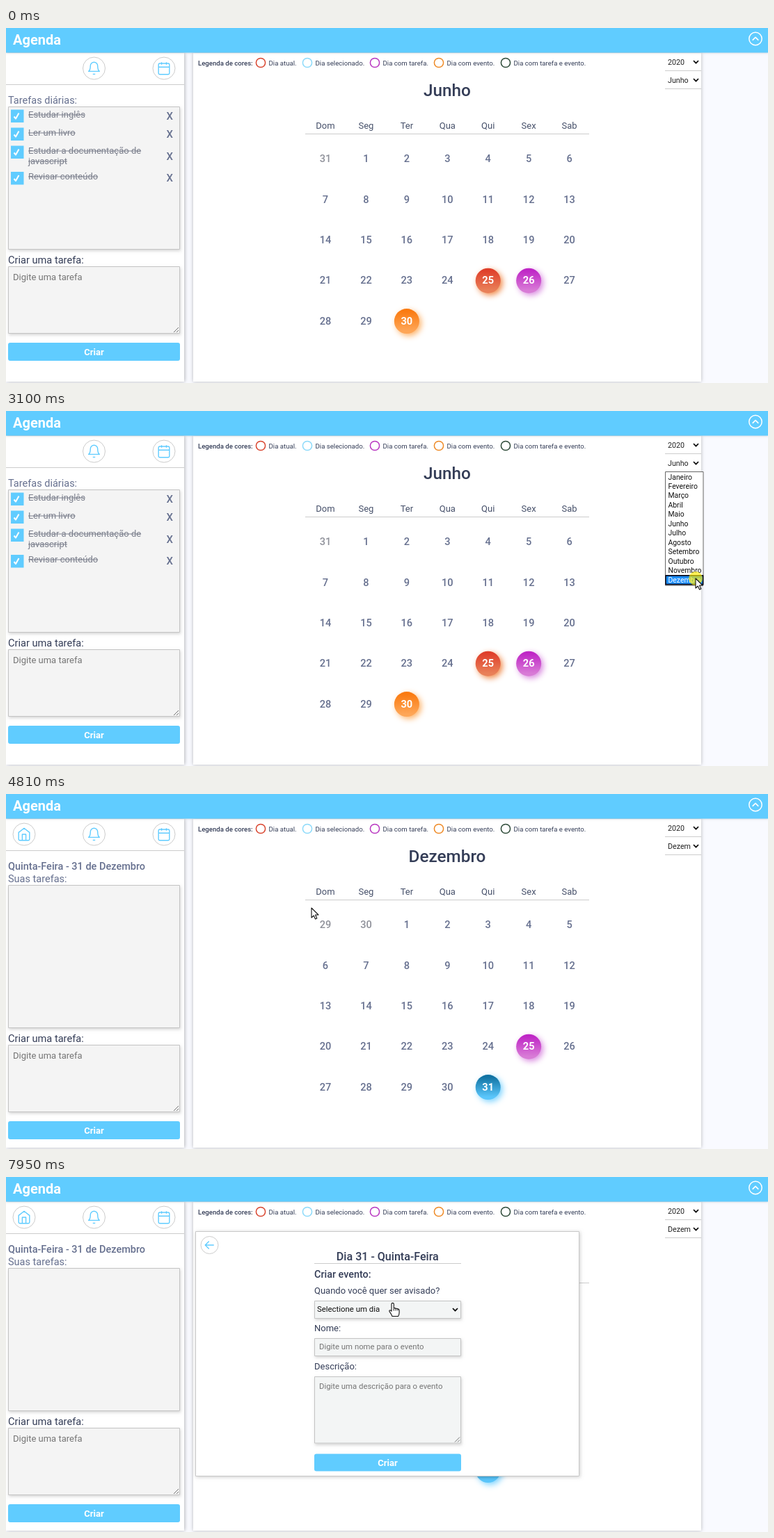
An HTML page with a canvas that plays this animation: 1095x511 px, repeating every 8000 ms.

```html
<!DOCTYPE html>
<html lang="pt">
<head>
<meta charset="utf-8">
<title>Agenda</title>
<style>
  html, body { margin: 0; height: 100%; overflow: hidden; background: #f9faff; }
  canvas { display: block; }
</style>
</head>
<body>
<canvas id="stage" width="1095" height="511"></canvas>
<script>
const LOOP = 8000;
const ctx = document.getElementById('stage').getContext('2d');
const BLUE = '#60ccff', LINE = '#ccc', SLATE = '#66708f', INK = '#343d57', HINT = '#757575';

const MONTHS = ['Janeiro', 'Fevereiro', 'Março', 'Abril', 'Maio', 'Junho', 'Julho',
  'Agosto', 'Setembro', 'Outubro', 'Novembro', 'Dezembro'];
const WEEKDAYS = ['Dom', 'Seg', 'Ter', 'Qua', 'Qui', 'Sex', 'Sab'];
const BADGES = {
  today: ['#df3f2b', '#e98058', '#f08a4a'],
  task: ['#bf26c6', '#d87bd6', '#d98ae0'],
  event: ['#fa7a10', '#fea657', '#fdb268'],
  selected: ['#1173a3', '#5ac6fb', '#7fd4ff']
};
const LEGEND = [
  [366, '#d9452f', 'Dia atual.'], [433, '#8cdafa', 'Dia selecionado.'],
  [530, '#b836c0', 'Dia com tarefa.'], [622, '#ee8a26', 'Dia com evento.'],
  [718, '#2d4a38', 'Dia com tarefa e evento.']
];
const ICONS = {
  home: new Path2D('M3 9l9-7 9 7v11a2 2 0 0 1-2 2H5a2 2 0 0 1-2-2zM9 22V12h6v10'),
  bell: new Path2D('M18 8A6 6 0 0 0 6 8c0 7-3 9-3 9h18s-3-2-3-9M13.7 21a2 2 0 0 1-3.4 0'),
  calendar: new Path2D('M5 4h14a2 2 0 0 1 2 2v14a2 2 0 0 1-2 2H5a2 2 0 0 1-2-2V6a2 2 0 0 1 2-2zM16 2v4M8 2v4M3 10h18'),
  back: new Path2D('M20 12H4M11 5l-7 7 7 7'),
  up: new Path2D('M6 15l6-6 6 6')
};
const ARROW = new Path2D('M0 0V14l3.3-3 2.2 5 2.3-1-2.2-5H10z');
const HAND = new Path2D('M-2 10V1a1.6 1.6 0 0 1 3.3 0V7q1.6-1 3 .5q1.7-.8 2.8.7q2-.5 2 1.8V13q0 3-1.5 5.5H-1q-1-3-3.5-6.2q-1.5-2 .3-2.6q1.2-.1 2.2 1.6z');

// Pointer movement comes in bursts: start, end, number of pictures
const BURSTS = [[230, 1000, 11], [1090, 1850, 11], [1940, 2170, 4], [3100, 3870, 11],
  [3950, 4740, 11], [4810, 5600, 11], [5690, 5920, 4], [6940, 7720, 11], [7790, 7950, 3]];
// Pointer path: time, x, y
const PATH = [
  [230, 866, 402], [620, 960, 230], [1000, 1056, 36], [1250, 1020, 34], [1430, 930, 60],
  [1570, 974, 71], [1850, 972, 75], [2017, 884, 165], [2093, 950, 225], [2170, 991, 241],
  [3200, 991, 241], [3500, 900, 340], [3870, 752, 408], [4260, 692, 419], [4590, 692, 419],
  [4740, 664, 310], [4810, 439, 164], [4968, 150, 84], [5126, 20, 51], [5290, 30, 58],
  [5600, 203, 64], [5920, 222, 62], [7090, 222, 62], [7400, 420, 130], [7720, 518, 180],
  [7950, 556, 182]
];
const HAND_TIMES = [[1500, 1930], [4180, 4660], [5110, 5300], [5600, 7170], [7640, 8000]];
const CLICKS = [[1610, 1720], [3100, 3180], [4340, 4500], [6940, 7020]];

const within = (t, spans) => spans.some(([a, b]) => t >= a && t < b);

function snap(t) {
  for (const [start, end, count] of BURSTS) {
    const step = (end - start) / (count - 1);
    if (t >= start && t < end) return start + Math.floor((t - start) / step + .1) * step;
  }
  return t;
}

function pointerAt(t) {
  const i = PATH.findIndex(p => p[0] > t);
  if (i < 0) return PATH[PATH.length - 1].slice(1);
  const [t0, x0, y0] = PATH[i - 1], [t1, x1, y1] = PATH[i];
  const k = (t - t0) / (t1 - t0);
  return [x0 + (x1 - x0) * k, y0 + (y1 - y0) * k];
}

function text(str, x, y, size, color, weight = 400, align = 'left') {
  ctx.font = `${weight} ${size}px Roboto, sans-serif`;
  ctx.fillStyle = color;
  ctx.textAlign = align;
  ctx.fillText(str, x, y);
}

function shadow(color, blur, dx = 0, dy = 0) {
  ctx.shadowColor = color;
  ctx.shadowBlur = blur;
  ctx.shadowOffsetX = dx;
  ctx.shadowOffsetY = dy;
}
const noShadow = () => shadow('transparent', 0);

function box(x, y, w, h, fill, border, radius = 0) {
  ctx.beginPath();
  ctx.roundRect(x, y, w, h, radius);
  ctx.fillStyle = fill;
  ctx.fill();
  noShadow();
  if (!border) return;
  ctx.beginPath();
  ctx.rect(x + .5, y + .5, w - 1, h - 1);
  ctx.lineWidth = 1;
  ctx.strokeStyle = border;
  ctx.stroke();
}

function circle(x, y, r, stroke, width, fill) {
  ctx.beginPath();
  ctx.arc(x, y, r, 0, 7);
  if (fill) { ctx.fillStyle = fill; ctx.fill(); noShadow(); }
  if (stroke) { ctx.strokeStyle = stroke; ctx.lineWidth = width; ctx.stroke(); }
}

function polyline(points, color, width = 1) {
  ctx.beginPath();
  points.forEach(([x, y]) => ctx.lineTo(x, y));
  ctx.strokeStyle = color;
  ctx.lineWidth = width;
  ctx.stroke();
}

const rule = (x0, x1, y) => polyline([[x0, y + .5], [x1, y + .5]], LINE);
const chevron = (x, y) => polyline([[x - 3.5, y - 2], [x, y + 1.7], [x + 3.5, y - 2]], '#111', 1.8);

function icon(name, x, y, scale, color = BLUE, width = 1.4) {
  ctx.save();
  ctx.translate(x - 12 * scale, y - 12 * scale);
  ctx.scale(scale, scale);
  ctx.lineWidth = width / scale;
  ctx.strokeStyle = color;
  ctx.stroke(ICONS[name]);
  ctx.restore();
}

function roundButton(name, x, hover) {
  if (hover) shadow('rgba(0,0,0,.4)', 6, 1, 2);
  circle(x, 58, 16, LINE, 1, '#fff');
  icon(name, x, 58, .87);
}

function field(x, y, w, h, fill = '#f4f4f4') {
  shadow('rgba(0,0,0,.16)', 4, 1, 2);
  box(x, y, w, h, fill, '#c4c4c4');
}

function textarea(x, y, w, h, hint, size, fill) {
  field(x, y, w, h, fill);
  text(hint, x + 7, y + (size > 12 ? 19.5 : 17.5), size, HINT);
  const right = x + w - 2, bottom = y + h - 2;
  for (const d of [7, 3]) polyline([[right - d, bottom], [right, bottom - d]], '#666', .9);
}

function button(x, y, w, h) {
  box(x, y, w, h, BLUE, null, 3);
  text('Criar', x + w / 2, y + h / 2 + 4.7, 13, '#fff', 700, 'center');
}

function task(lines, y, markY) {
  box(7, markY - 9, 18.5, 18.5, BLUE);
  polyline([[11.5, markY + 1], [14, markY + 4], [18.5, markY - 4]], '#fff', 2);
  lines.forEach((line, i) => {
    const base = y + i * 15;
    text(line, 32, base, 13, '#7b7f8c');
    const width = ctx.measureText(line).width;
    polyline([[32, base - 4], [32 + width, base - 4]], '#7b7f8c');
  });
  text('X', 235.3, y + (lines.length > 1 ? 8.5 : 2.5), 15, SLATE, 500, 'center');
}

function sidebar(daySelected, hoverX) {
  shadow('rgba(0,0,0,.28)', 5, 1, 0);
  box(0, 36, 256, 473, '#fff');
  rule(0, 256, 81);
  if (daySelected) roundButton('home', 26, hoverX === 26);
  roundButton('bell', 126.5, hoverX === 126.5);
  roundButton('calendar', 227, hoverX === 227);

  const shift = daySelected ? 18 : 0;
  field(3, 113 + shift, 247, 206);
  if (daySelected) {
    text('Quinta-Feira - 31 de Dezembro', 3, 109, 14.5, SLATE, 500);
    text('Suas tarefas:', 3, 126.5, 14.5, SLATE);
  } else {
    text('Tarefas diárias:', 3, 109, 14.5, SLATE);
    task(['Estudar inglês'], 129, 126.5);
    task(['Ler um livro'], 155, 152.5);
    task(['Estudar a documentação de', 'javascript'], 181, 178.5);
    task(['Revisar conteúdo'], 218, 216);
  }
  text('Criar uma tarefa:', 3, 339 + shift, 14.6, INK);
  textarea(3, 343 + shift, 247, 97, 'Digite uma tarefa', 13);
  button(3, 453 + shift, 247, 26);
}

function calendar(month, lead, length, badges) {
  text(month, 634, 98, 24.3, INK, 500, 'center');
  const columnX = i => 459 + 58.43 * i;
  WEEKDAYS.forEach((day, i) => text(day, columnX(i), 145, 13, '#46506a', 400, 'center'));
  rule(430, 838, 152);
  for (let i = 0; i < lead.length + length; i++) {
    const day = i - lead.length + 1, outside = day < 1;
    const x = columnX(i % 7), y = 188 + 58.4 * Math.floor(i / 7);
    const badge = !outside && BADGES[badges[day]];
    if (badge) {
      const fill = ctx.createLinearGradient(0, y - 18, 0, y + 18);
      fill.addColorStop(.1, badge[0]);
      fill.addColorStop(.9, badge[1]);
      shadow(badge[2], 8, 3, 3);
      circle(x, y + .5, 18, null, 0, fill);
    }
    text(outside ? lead[i] : day, x, y + 5.2, 14.6,
      badge ? '#fff' : outside ? '#8f919a' : SLATE, badge ? 700 : 500, 'center');
  }
}

function mainPanel(t) {
  shadow('rgba(0,0,0,.28)', 5, 0, 0);
  box(269, 36, 730, 473, '#fff');
  text('Legenda de cores:', 276, 53.5, 9.6, INK, 500);
  for (const [x, color, label] of LEGEND) {
    circle(x, 50, 6.6, color, 1.5);
    text(label, x + 11.5, 53.5, 9.65, INK);
  }
  const december = t >= 3250;
  if (december) {
    calendar('Dezembro', [29, 30], 31, { 25: 'task', 31: t >= 4340 && 'selected' });
  } else {
    calendar('Junho', [31], 30, { 25: 'today', 26: 'task', 30: 'event' });
  }
  [['2020', 49], [december ? 'Dezem' : 'Junho', 75]].forEach(([value, y]) => {
    text(value, 951, y + 4, 10.7, '#222');
    chevron(991.5, y);
    rule(947, 999, y + 12);
  });
}

function monthList(active) {
  box(947, 87, 55.5, 164.5, '#fff', '#666');
  MONTHS.forEach((month, i) => {
    const y = 95 + 13.47 * i;
    if (i === active) {
      box(948, y - 6.5, 53.5, 13, '#1e90ff');
      ctx.strokeStyle = '#0a0a1a';
      ctx.lineWidth = 1.6;
      ctx.strokeRect(948, y - 6.3, 53.5, 12.8);
    }
    text(month, 951.5, y + 3.5, 10.4, i === active ? '#fff' : '#111');
  });
}

function eventForm(opacity) {
  ctx.globalAlpha = opacity;
  shadow('rgba(0,0,0,.2)', 5, 1, 1);
  box(272, 78, 552, 353, '#fff', '#c8c8c8');
  circle(292.5, 98, 12.5, LINE, 1);
  icon('back', 292.5, 98, .78);
  text('Dia 31 - Quinta-Feira', 548.3, 120, 16.1, INK, 500, 'center');
  rule(443, 654, 124);
  text('Criar evento:', 443, 145, 14.4, INK, 500);
  text('Quando você quer ser avisado?', 443, 168, 13, INK);
  const fill = '#f3f5f5';
  field(443, 178, 211, 26, fill);
  text('Selectione um dia', 447, 194, 11.4, '#111');
  chevron(645.5, 191);
  text('Nome:', 443, 222, 13, INK);
  field(443, 232, 211, 26, fill);
  text('Digite um nome para o evento', 450, 248.3, 11.35, HINT);
  text('Descrição:', 443, 276.5, 13, INK);
  textarea(443, 287, 211, 96.5, 'Digite uma descrição para o evento', 11.35, fill);
  button(443, 398.5, 211, 25);
  ctx.globalAlpha = 1;
}

function header() {
  shadow('rgba(0,0,0,.15)', 3, 0, 0);
  box(0, 0, 1095, 35.5, BLUE);
  text('Agenda', 10, 23.5, 20, '#fff', 700);
  circle(1077, 15.5, 9.2, '#fff', 1.5);
  icon('up', 1077, 15.5, .72, '#fff', 1.6);
}

function tooltip() {
  box(228, 74, 69.5, 20, '#2b2b2b');
  ctx.font = '9.7px "Open Sans", sans-serif';
  ctx.fillStyle = '#fff';
  ctx.textAlign = 'center';
  ctx.fillText('Criar Eventos', 262.7, 87.7);
}

function pointer(t, x, y) {
  if (within(t, CLICKS)) circle(x, y, 10, null, 0, 'rgba(255,236,0,.65)');
  const shape = within(t, HAND_TIMES) ? HAND : ARROW;
  ctx.save();
  ctx.translate(x, y);
  ctx.fillStyle = '#fff';
  ctx.fill(shape);
  ctx.strokeStyle = '#111';
  ctx.lineWidth = 1.1;
  ctx.stroke(shape);
  if (shape === HAND) {
    for (const dx of [1.3, 4.2, 7]) polyline([[dx, 7.5], [dx, 10.5]], '#111');
  }
  ctx.restore();
}

function draw(time) {
  const t = snap(time);
  const [x, y] = t < 230 ? [-50, -50] : pointerAt(t);
  const hoverX = [26, 126.5, 227].find(cx => Math.hypot(x - cx, y - 58) < 16);
  ctx.lineJoin = 'round';
  ctx.fillStyle = '#f9faff';
  ctx.fillRect(0, 0, 1095, 511);
  mainPanel(t);
  sidebar(t >= 4490, hoverX);
  header();
  if (t >= 1570 && t < 3170) monthList(t >= 2160 ? 11 : 5);
  if (t >= 7090) eventForm(Math.min(1, (t - 7010) / 240));
  if (t >= 6240 && t < 6940) tooltip();
  if (t >= 230) pointer(t, x, y);
}

function frame() {
  draw(performance.now() % LOOP);
  requestAnimationFrame(frame);
}
frame();
</script>
</body>
</html>
```
